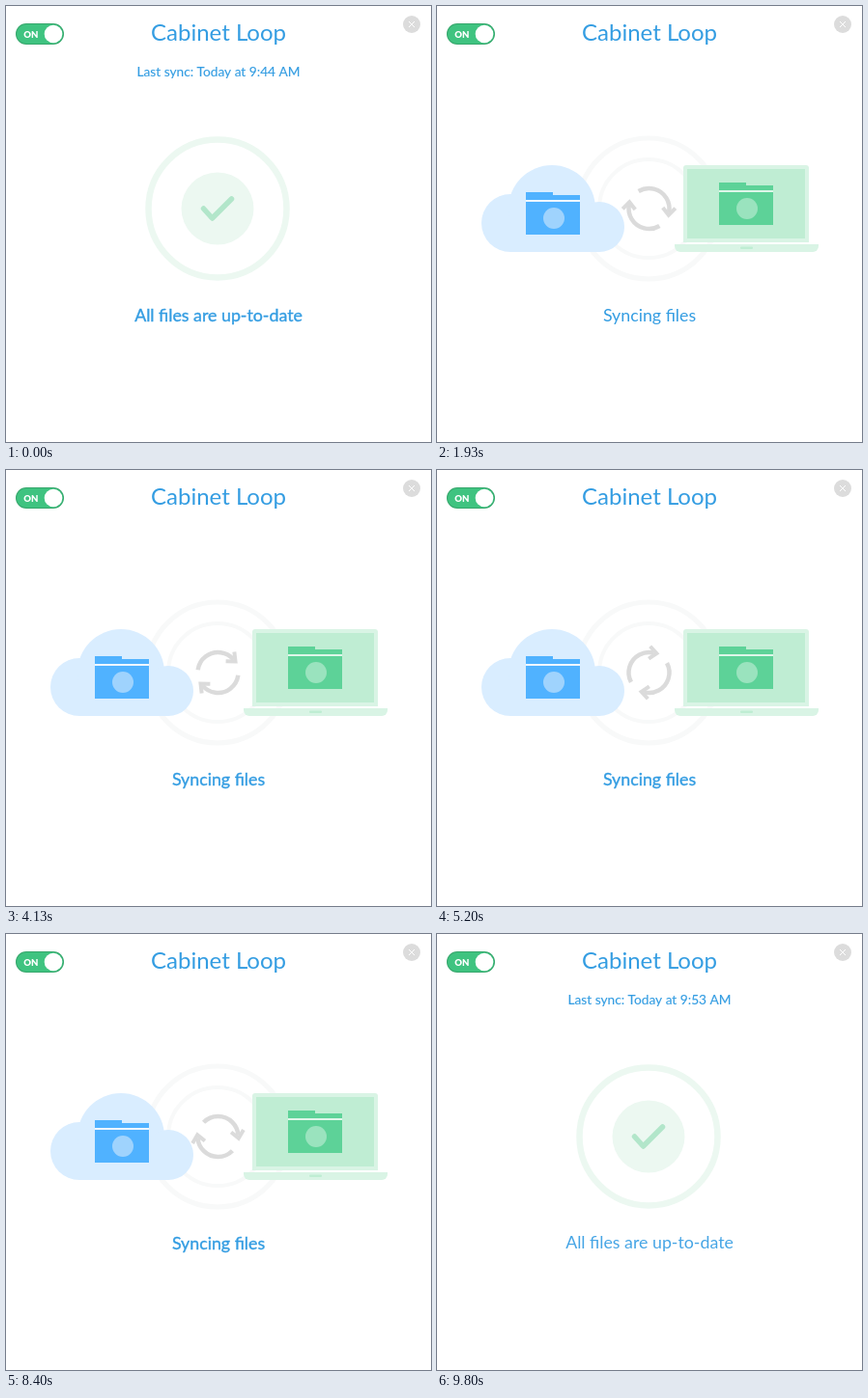
These frames come from a looping animation (440 px wide and 452 px high, 9.87 s). An HTML page with a canvas:

```html
<!DOCTYPE html>
<html lang="en">
<head>
<meta charset="utf-8">
<title>Sync status</title>
<style>
html, body { margin: 0; width: 440px; height: 452px; overflow: hidden; background: #fff; }
canvas { display: block; }
</style>
</head>
<body>
<canvas id="stage" width="440" height="452"></canvas>
<script>
const ctx = document.getElementById('stage').getContext('2d');
const LOOP = 9870, SYNC_START = 1130, SYNC_END = 9130, FADE = 800, STEP = 1000 / 15;
const BLUE = '#349de2', GREEN = '#3fc380', MINT = '#ecf8f1';
const CX = 219, CY = 210;

const clamp = v => Math.min(1, Math.max(0, v));
const ease = p => p < 0.5 ? 2 * p * p : 1 - 2 * (1 - p) ** 2;
const progress = (t, start) => ease(clamp((t - start) / FADE));

function rect(x, y, w, h, color) {
  ctx.fillStyle = color;
  ctx.fillRect(x, y, w, h);
}

function roundRect(x, y, w, h, radii, color) {
  ctx.fillStyle = color;
  ctx.beginPath();
  ctx.roundRect(x, y, w, h, radii);
  ctx.fill();
}

function disc(x, y, r, color) {
  ctx.fillStyle = color;
  ctx.beginPath();
  ctx.arc(x, y, r, 0, Math.PI * 2);
  ctx.fill();
}

function ring(r, width, color) {
  ctx.strokeStyle = color;
  ctx.lineWidth = width;
  ctx.beginPath();
  ctx.arc(CX, CY, r, 0, Math.PI * 2);
  ctx.stroke();
}

function line(points, width, color) {
  ctx.strokeStyle = color;
  ctx.lineWidth = width;
  ctx.beginPath();
  points.forEach(([x, y]) => ctx.lineTo(x, y));
  ctx.stroke();
}

function text(str, y, size, weight = 0) {
  ctx.font = `${size}px Lato, sans-serif`;
  ctx.textAlign = 'center';
  ctx.fillStyle = ctx.strokeStyle = BLUE;
  ctx.fillText(str, 220, y);
  if (weight) {
    ctx.lineWidth = weight;
    ctx.strokeText(str, 220, y);
  }
}

function layer(alpha, dx, dy, draw) {
  if (alpha <= 0) return;
  ctx.save();
  ctx.globalAlpha = clamp(alpha);
  ctx.translate(dx, dy);
  draw();
  ctx.restore();
}

function header() {
  text('Cabinet Loop', 36, 24);
  roundRect(10, 18, 50, 22, 11, '#36a76c');
  roundRect(11, 19, 48, 20, 10, GREEN);
  disc(49, 29, 9.3, '#fff');
  ctx.font = '900 9.5px Lato, sans-serif';
  ctx.textAlign = 'left';
  ctx.fillStyle = '#fff';
  ctx.fillText('ON', 18.3, 32.6);
  disc(420, 19, 9, '#dcdcdc');
  line([[417, 16], [423, 22]], 1, '#fff');
  line([[423, 16], [417, 22]], 1, '#fff');
}

function folder(x, y, color, badge) {
  rect(x, y, 28, 4, color);
  rect(x, y + 3, 56, 5, color);
  rect(x, y + 10, 56, 34, color);
  disc(x + 29, y + 27, 11, badge);
}

function cloud() {
  const color = '#d9edff';
  disc(76, 225, 30, color);
  disc(119, 210, 45, color);
  disc(168, 229, 26, color);
  rect(76, 225, 92, 30, color);
  rect(92, 201, 56, 2, '#eef7ff');
  folder(92, 193, '#50b2ff', '#9fd3fd');
}

function laptop() {
  const frame = '#d9f4e5', screen = '#bfedd3';
  roundRect(255, 165, 130, 80, [3, 3, 0, 0], frame);
  rect(259, 169, 122, 72, screen);
  roundRect(246, 247, 149, 8, [0, 0, 6, 6], frame);
  roundRect(314, 249.5, 13, 2.5, 1, screen);
  rect(292, 191, 56, 2, '#def6e9');
  folder(292, 183, '#5dd298', '#9ae3be');
}

function arrows(degrees) {
  const r = 21, color = '#dbdbdb';
  ctx.save();
  ctx.translate(CX + 0.5, CY);
  ctx.rotate(degrees * Math.PI / 180);
  for (let i = 0; i < 2; i++) {
    ctx.strokeStyle = color;
    ctx.lineWidth = 4.5;
    ctx.beginPath();
    ctx.arc(0, 0, r, -2.25, 0.05);
    ctx.stroke();
    line([[r - 7, -3], [r, 4], [r + 6, -4]], 4, color);
    ctx.rotate(Math.PI);
  }
  ctx.restore();
}

function check() {
  ring(71.5, 6.5, MINT);
  disc(CX, CY, 37.5, MINT);
  ctx.lineCap = ctx.lineJoin = 'round';
  line([[204.5, 210], [213.5, 220], [233.5, 200]], 5.5, '#b2e6ca');
}

function render(now) {
  const raw = now % LOOP;
  const t = raw < SYNC_START ? 0
    : SYNC_START + (Math.floor((raw - SYNC_START) / STEP + 0.05) + 0.2) * STEP;
  const finishing = t >= SYNC_END;
  const p = progress(t, finishing ? SYNC_END : SYNC_START);
  const enter = clamp((p - 0.15) / 0.75), leave = clamp(1 - p / 0.65);
  const syncing = finishing ? leave : enter;
  const done = finishing ? enter : leave;
  const shift = finishing ? p : 1 - p;
  const inY = -20 * (1 - p), outY = 20 * p;
  const textIn = p * p;

  rect(0, 0, 440, 452, '#fff');
  header();

  layer(syncing, 0, 0, () => {
    ring(73, 5, '#f8f9f9');
    ring(51, 4, '#f8f9f9');
  });
  layer(done, 0, 0, () => {
    text(`Last sync: Today at ${finishing ? '9:53' : '9:44'} AM`, 73, 13.7, 0.15);
    check();
  });
  layer(syncing, -60 * shift, 0, cloud);
  layer(syncing, 60 * shift, 0, laptop);
  layer(syncing, 0, 0, () => arrows(0.304 * t - 43));

  layer(finishing ? textIn : leave, 0, finishing ? inY : outY,
    () => text('All files are up-to-date', 327, 17.8, finishing ? 0 : 0.4));
  layer(finishing ? leave : textIn, 0, finishing ? outY : inY,
    () => text('Syncing files', 327, 17.8, t < 2130 ? 0 : 0.4));
}

const begin = performance.now();
function tick() {
  render(performance.now() - begin);
  requestAnimationFrame(tick);
}
tick();
</script>
</body>
</html>
```
